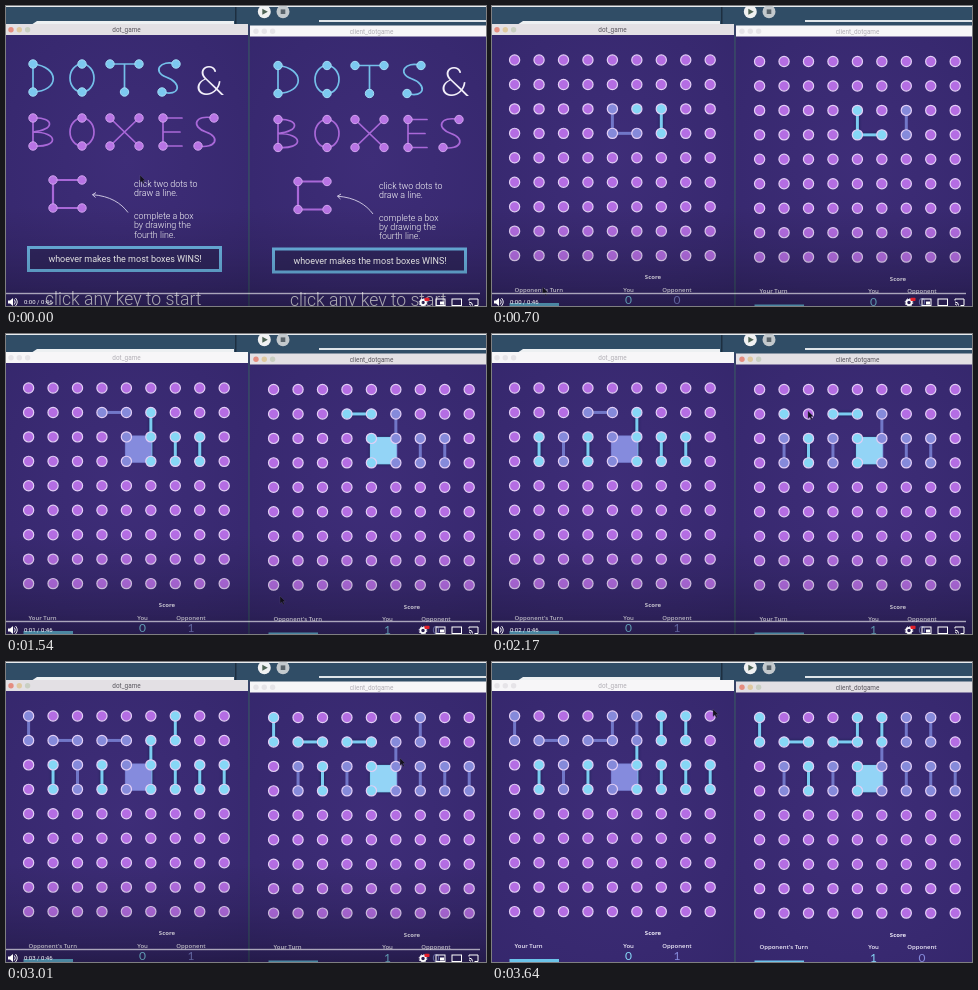
An HTML page for the animation above (3.71 s loop, 480 by 300 pixels).

```html
<!DOCTYPE html>
<html lang="en">
<head>
<meta charset="utf-8">
<title>Dots & Boxes</title>
<style>
html, body { margin: 0; width: 100%; height: 100%; overflow: hidden; background: #304d66; }
svg { display: block; width: 480px; height: 300px; }
text { font-family: Roboto, "Open Sans", sans-serif; }
.stat { font: 600 6px "Open Sans", "Noto Sans", sans-serif; fill: #f0ecfa; }
.num { font: 400 12px Lato, sans-serif; text-anchor: middle; }
.mid { text-anchor: middle; }
.copy { font-size: 8.9px; font-weight: 300; fill: #fff; }
.art { fill: none; stroke-width: 1.7; stroke-linecap: round; stroke-linejoin: round; }
.own { filter: drop-shadow(0 0 1.5px #16204f); }
</style>
</head>
<body>
<svg id="stage" viewBox="0 0 480 300">
  <defs>
    <linearGradient id="shade" x1="0" y1="0" x2="0" y2="1">
      <stop offset="0" stop-color="#000" stop-opacity="0"/>
      <stop offset=".45" stop-color="#000" stop-opacity=".09"/>
      <stop offset=".8" stop-color="#000" stop-opacity=".2"/>
      <stop offset="1" stop-color="#000" stop-opacity=".32"/>
    </linearGradient>
    <radialGradient id="felt" cx=".5" cy=".45" r=".75">
      <stop offset="0" stop-color="#3e2d78"/>
      <stop offset="1" stop-color="#35276c"/>
    </radialGradient>
    <g id="splash">
      <g class="art" stroke="#74bfe9">
        <path d="M27 58V86C54 85 54 61 27 58M104 58H133M118.500 58V86M170 58C154 53 146 66 160 71C177 77 174 91 156 86"/>
        <ellipse cx="76" cy="72" rx="12" ry="14"/>
      </g>
      <g class="art" stroke="#a968d8">
        <path d="M27 112V140C53 142 53 126 27 126C49 124 49 111 27 112M104 112L133 140M133 112L104 140M176 112H157V140H176M157 126H174M208 112C188 108 185 121 200 126C215 131 210 143 192 140"/>
        <ellipse cx="76" cy="126" rx="12" ry="14"/>
        <path d="M76 174H47V202H76" stroke-width="2.200"/>
      </g>
      <g id="blueNodes" fill="#7cc9f0" stroke="#a5dcf5"/>
      <g id="pinkNodes" fill="#b873e5" stroke="#d0a4ee"/>
      <text x="204" y="88.500" class="mid" style="font:300 42px Lato,sans-serif" fill="#f3f0fa">&amp;</text>
      <path d="M122 206.500C115 197 104 190 86.500 188.700M90 186.500L86.500 188.700L89.500 191.500" fill="none" stroke="#d9d3ea" stroke-width=".9"/>
      <text class="copy"><tspan x="128" y="181">click two dots to</tspan><tspan x="128" y="190">draw a line.</tspan><tspan x="128" y="213">complete a box</tspan><tspan x="128" y="222.400">by drawing the</tspan><tspan x="128" y="231.700">fourth line.</tspan></text>
      <rect x="22.500" y="241.500" width="192" height="23" fill="#30265f" stroke="#6bb3e2" stroke-width="3"/>
      <text x="119" y="256" class="copy mid" style="font-size:9px;font-weight:400">whoever makes the most boxes WINS!</text>
      <text x="39" y="298.700" style="font-size:17.600px;font-weight:300" fill="#f1eef9">click any key to start</text>
    </g>
  </defs>

  <rect width="480" height="300" fill="#304d66"/>
  <rect width="480" height="1" fill="#e9edf0"/>
  <path d="M31 15H228V19H25Z" fill="#edf0f2"/>
  <rect x="313" y="14" width="167" height="2" fill="#dfe5e9"/>
  <rect x="229" y="1" width="1.500" height="18" fill="#1d2f40"/>
  <circle cx="258.300" cy="5.700" r="6.500" fill="#f0f1f2"/>
  <path d="M256.300 2.700L261.800 5.700L256.300 8.700Z" fill="#4d6354"/>
  <circle cx="277" cy="5.700" r="6.500" fill="#c3c9cd"/>
  <rect x="274.700" y="3.400" width="4.600" height="4.600" fill="#5a646b"/>
  <g id="windows"></g>

  <path id="cursor" d="M0 0V7.500L1.800 6L3.200 8.800L4.400 8.200L3.100 5.500H5.500Z" fill="#15121f" stroke="#5b5280" stroke-width=".4"/>

  <g id="controls">
    <rect y="200" width="480" height="100" fill="url(#shade)"/>
    <rect x="0" y="286.800" width="474" height="1.400" fill="#fff" opacity=".6"/>
    <g fill="#fff">
      <path d="M2 294.500H4L7 292V300L4 297.500H2Z"/>
      <path d="M8.300 293.500Q10.300 296 8.300 298.500M9.500 292Q13 296 9.500 300" fill="none" stroke="#fff" stroke-width=".9"/>
      <text id="clock" x="18" y="298.300" font-size="6"></text>
      <circle cx="417" cy="296.500" r="2.600" fill="none" stroke="#fff" stroke-width="1.700"/>
      <circle cx="417" cy="296.500" r="3.800" fill="none" stroke="#fff" stroke-width="1" stroke-dasharray="1.500 1.480"/>
      <rect x="418.500" y="291.800" width="5" height="3.200" rx=".8" fill="#e3202b"/>
    </g>
    <g fill="none" stroke="#fff" stroke-width="1">
      <rect x="430" y="293" width="9" height="6.500"/>
      <rect x="434.500" y="296" width="3" height="2" fill="#fff"/>
      <rect x="446" y="293" width="9.500" height="6.500"/>
      <path d="M463 294.500V293H472V299.500H468.500M463 296Q466.500 296 466.500 299.500M463 298Q464.500 298 464.500 299.500"/>
    </g>
  </g>
</svg>
<script>
const NS = "http://www.w3.org/2000/svg", LOOP = 3710, STEP = 70;
const START = 140, FIRST = 420, BOX = 1190, GAP = 24.45;
const DOT = "#b46de3", MINE = { dot: "#86d7f6", line: "#7bcdf1", box: "#93d4f6" },
      THEIRS = { dot: "#858ada", line: "#7177c8", box: "#858bdd" };

// time, player, first dot and second dot as column-row digits
const moves = `420 A 62 63,560 B 42 43,700 B 43 53,840 A 52 53,1050 A 72 73,1190 B 42 52,
1330 A 51 52,1470 B 31 41,1750 A 32 33,1890 B 22 23,2030 A 12 13,2310 B 11 21,
2520 A 82 83,2730 B 00 01,2940 A 60 61,3220 B 50 51,3360 A 70 71,3500 B 40 41`
  .split(",").map(s => {
    const [t, who, a, b] = s.trim().split(" ");
    return { t: +t, who, a, b };
  });

const mouse = [[0, 134, 169], [350, 46, 271], [980, 54, 289], [1190, 372, 128], [1330, 145, 102],
  [1540, 274, 262], [1750, 96, 127], [2030, 47, 127], [2170, 316, 77], [2310, 317, 79],
  [2730, 267, 79], [2940, 169, 78], [3010, 394, 96], [3220, 390, 79], [3360, 194, 78],
  [3500, 366, 79], [3640, 221, 47], [3710, 221, 47]];

const $ = id => document.getElementById(id);
function add(parent, tag, attrs = {}, text) {
  const el = document.createElementNS(NS, tag);
  for (const k in attrs) el.setAttribute(k, attrs[k]);
  if (text !== undefined) el.textContent = text;
  return parent.appendChild(el);
}
const show = (el, on) => el.setAttribute("visibility", on ? "inherit" : "hidden");
const pos = id => [22.6 + GAP * id[0], 54 + GAP * id[1]];

function nodes(id, list) {
  for (const p of list.split(" ")) {
    const [cx, cy] = p.split(",");
    add($(id), "circle", { cx, cy, r: 4.2 });
  }
}
nodes("blueNodes", "27,58 27,86 76,58 76,86 104,58 133,58 118.5,86 170,58 156,86");
nodes("pinkNodes", "27,112 27,140 76,112 76,140 104,112 133,112 104,140 133,140 157,112 157,140 208,112 192,140 47,174 76,174 47,202 76,202");

function makeWindow(who, title, x, y) {
  const g = add($("windows"), "g", { transform: `translate(${x} ${y})` });
  const style = p => p === who ? MINE : THEIRS;
  add(g, "rect", { x: -2.5, y: 18, width: 1.5, height: 290, fill: "#3b4068" });
  add(g, "rect", { x: -1, y: 28, width: 243, height: 280, fill: "url(#felt)" });
  const bar = add(g, "rect", { x: -1, y: 18, width: 243, height: 11 });
  const lights = ["#e58d80", "#dfc9a0", "#c9cfc2"].map((c, i) =>
    [add(g, "circle", { cx: 5 + 8.3 * i, cy: 23.7, r: 2.7 }), c]);
  const name = add(g, "text", { x: 120.5, y: 26, class: "mid", "font-size": 6.4 }, title);

  const splash = add(g, "use", { href: "#splash" });
  const board = add(g, "g");
  const lines = moves.map(m => {
    const [x1, y1] = pos(m.a), [x2, y2] = pos(m.b);
    const el = add(board, "line", { x1, y1, x2, y2, stroke: style(m.who).line, "stroke-width": 3 });
    // a straight line has an empty bounding box, so its group carries the shadow
    const wrap = add(board, "g", m.who === who ? { class: "own" } : {});
    add(wrap, "rect", { x: x1 - 5, y: y1 - 5, width: x2 - x1 + 10, height: y2 - y1 + 10, fill: "none" });
    wrap.appendChild(el);
    return wrap;
  });
  const [bx, by] = pos("42");
  const box = add(board, "rect", { x: bx - 0.8, y: by - 0.8, width: GAP + 1.6, height: GAP + 1.6, fill: style("B").box });
  const dots = {};
  for (let r = 0; r < 9; r++) for (let c = 0; c < 9; c++) {
    const [cx, cy] = pos("" + c + r);
    dots["" + c + r] = add(board, "circle", { cx, cy, r: 5.1, stroke: "#e2cff5", "stroke-width": 1.2 });
  }
  const turn = add(board, "text", { x: 22.5, y: 285.5, class: "stat" });
  add(board, "rect", { x: 17.5, y: 297, width: 49.5, height: 3, fill: "#6cc4ea" });
  const score = add(board, "g");
  const label = (x, y, s) => add(score, "text", { x, y, class: "stat mid" }, s);
  label(161, 273, "Score").style.fontWeight = 700;
  label(136.5, 285.5, "You");
  label(185, 285.5, "Opponent");
  const points = ["A", "B"].map(p => add(score, "text",
    { x: p === who ? 136.5 : 185, y: 298, class: "num", fill: style(p).dot }));

  return t => {
    let active = "A", done = 0;
    const owner = {}, colour = {};
    const claim = (id, p) => {
      // before the first box, each player's own dots stay on top
      if (t < BOX && owner[id] === who) return;
      owner[id] = p;
      colour[id] = style(p).dot;
    };
    moves.forEach((m, i) => {
      const drawn = t >= m.t;
      show(lines[i], drawn);
      if (t >= m.t - 2 * STEP) active = m.who;
      if (drawn) {
        done++;
        claim(m.a, m.who);
        claim(m.b, m.who);
      } else if (m.who === who) {
        if (t >= m.t - 2 * STEP) colour[m.a] = MINE.dot;
        if (t >= m.t - STEP) colour[m.b] = MINE.dot;
      }
    });
    for (const id in dots) dots[id].setAttribute("fill", colour[id] || DOT);
    show(splash, t < START);
    show(board, t >= START);
    show(score, t >= FIRST);
    show(box, t >= BOX);
    turn.textContent = (done % 2 === 0) === (who === "A") ? "Your Turn" : "Opponent's Turn";
    points[0].textContent = 0;
    points[1].textContent = t >= BOX ? 1 : 0;
    const on = active === who;
    bar.setAttribute("fill", on ? "#e3e0e4" : "#f7f6f8");
    name.setAttribute("fill", on ? "#5a575f" : "#b3b0b7");
    for (const [el, c] of lights) el.setAttribute("fill", on ? c : "#e6e4e8");
  };
}

const views = [makeWindow("A", "dot_game", 0, 0), makeWindow("B", "client_dotgame", 245, 1.5)];

function render(t) {
  views.forEach(view => view(t));
  const i = mouse.findIndex(p => p[0] > t);
  const [t0, x0, y0] = mouse[i - 1], [t1, x1, y1] = mouse[i];
  const k = (t - t0) / (t1 - t0);
  $("cursor").setAttribute("transform", `translate(${x0 + (x1 - x0) * k} ${y0 + (y1 - y0) * k})`);
  $("clock").textContent = `0:0${Math.floor((t + 60) / 1000)} / 0:46`;
  $("controls").setAttribute("opacity", Math.max(0, Math.min(1, (3430 - t) / 210)));
}

const begin = performance.now();
function tick() {
  const t = (performance.now() - begin) % LOOP;
  render(Math.floor(t / STEP) * STEP);
  requestAnimationFrame(tick);
}
tick();
</script>
</body>
</html>
```
